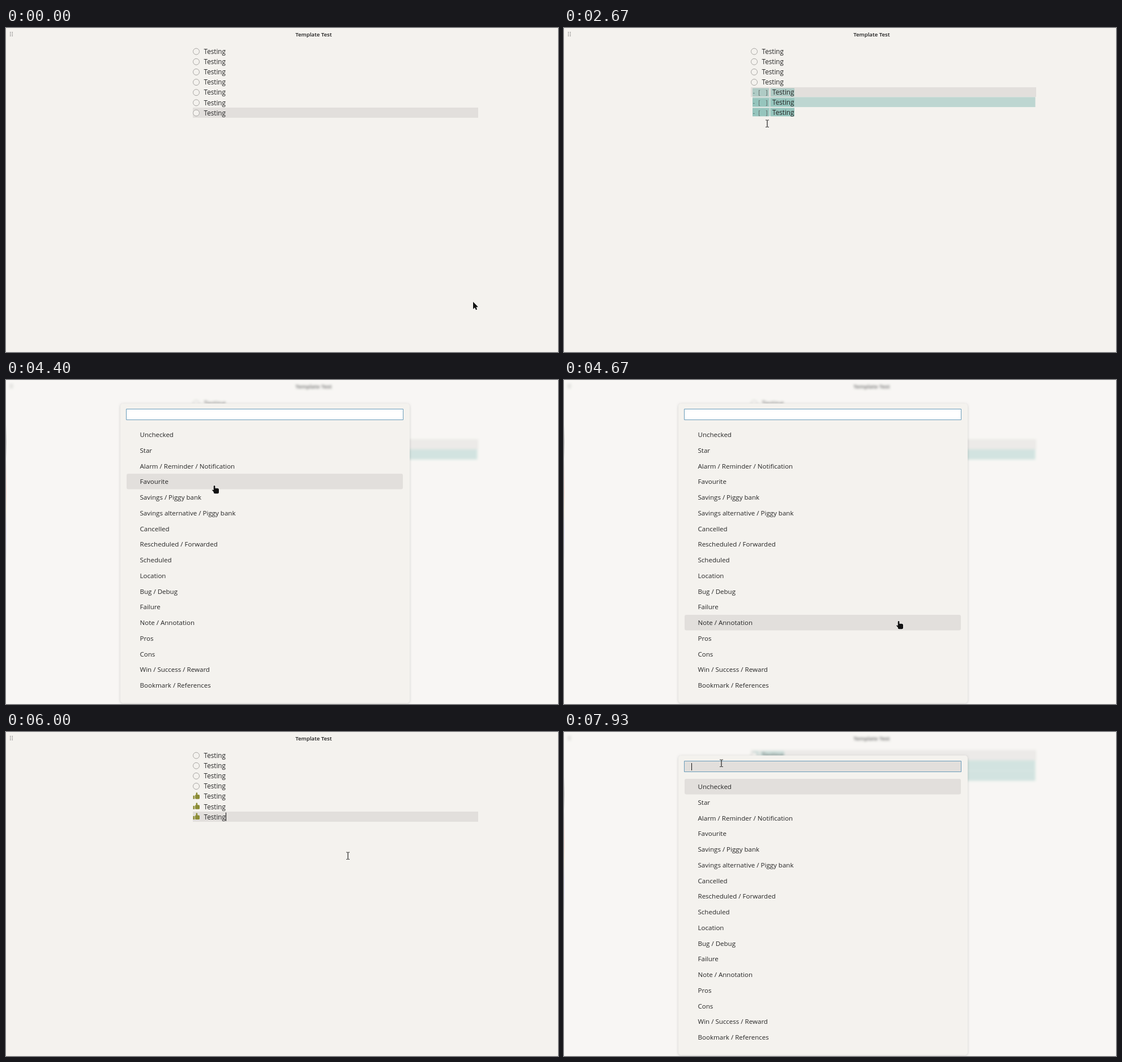
An HTML page with a canvas for the animation above (8000 ms loop, 975x574 px).

```html
<!DOCTYPE html>
<html lang="en">
<head>
<meta charset="utf-8">
<title>Template Test</title>
<style>
html, body { margin: 0; width: 975px; height: 574px; overflow: hidden; background: #f4f2ee; }
canvas { display: block; }
</style>
</head>
<body>
<canvas id="stage" width="975" height="574"></canvas>
<script>
const W = 975, H = 574, LOOP = 8000;
const BG = '#f4f2ee', GRAY = '#e2dfdc', TEAL = '#bdd6d1', INK = '#262626';
const MARK = 'rgba(72,160,150,.33)';
const SANS = '"Open Sans", "Noto Sans", sans-serif';
const ROW_TOP = 32, ROW_H = 18.15, RAW_H = 17.75;
const ITEM_TOP = 83, ITEM_H = 27.75;
const ITEMS = ['Unchecked', 'Star', 'Alarm / Reminder / Notification', 'Favourite',
  'Savings / Piggy bank', 'Savings alternative / Piggy bank', 'Cancelled',
  'Rescheduled / Forwarded', 'Scheduled', 'Location', 'Bug / Debug', 'Failure',
  'Note / Annotation', 'Pros', 'Cons', 'Win / Success / Reward', 'Bookmark / References'];

// Pointer moves: begin, end, goal x, goal y; it rests in between
const MOVES = [
  [0, 530, 323, 152], [530, 730, 414, 151],
  [1730, 2530, 330, 113], [2600, 2670, 359, 169],
  [4200, 4400, 368, 187], [4400, 4670, 591, 427], [4670, 5270, 602, 455],
  [5470, 6000, 604, 219], [6000, 6270, 400, 97],
  [6330, 6870, 270, 36], [7130, 7470, 278, 55]];

const stage = document.getElementById('stage');
const ctx = stage.getContext('2d');
const page = document.createElement('canvas');
page.width = W;
page.height = H;
const pageCtx = page.getContext('2d');

const between = (t, a, b) => t >= a && t < b;
const clamp = (v, lo, hi) => Math.min(hi, Math.max(lo, v));

function pointer(t) {
  let x = 825, y = 485;
  for (const [begin, end, goalX, goalY] of MOVES) {
    const k = clamp((t - begin) / (end - begin), 0, 1);
    x += (goalX - x) * k;
    y += (goalY - y) * k;
  }
  return { x, y };
}

function rect(g, x, y, w, h, fill) {
  g.fillStyle = fill;
  g.fillRect(x, y, w, h);
}

function rounded(g, x, y, w, h, r, fill) {
  g.beginPath();
  g.roundRect(x, y, w, h, r);
  g.fillStyle = fill;
  g.fill();
}

function label(g, str, x, y, font, fill = INK) {
  g.font = font;
  g.fillStyle = fill;
  g.fillText(str, x, y);
}

// Editor state at time t: active row, selection, raw rows, caret
function editor(t, p) {
  const s = { active: 6, from: -1, to: -1, headX: 389, raw: false, caret: true, done: t >= 5470 };
  const select = (lo, hi, dragging) => {
    const row = Math.floor((p.y - ROW_TOP) / ROW_H);
    s.active = s.from = dragging ? clamp(row, lo, hi) : lo;
    s.to = hi;
    const column = clamp(Math.round((p.x - 350) / 5.6), 0, 7);
    s.headX = !dragging || p.x < 347 ? 333 : 350 + column * 5.6;
  };
  if (t < 1730) {
    s.caret = t >= 1070;
  } else if (t < 5470) {
    select(4, 6, t < 2530);
    s.raw = between(t, 2600, 3670);
    s.caret = t < 2670 || between(t, 3270, 3670);
  } else if (t >= 6330) {
    select(0, 3, t < 6870);
    s.raw = between(t, 7130, 7800);
    s.caret = t < 7400;
  }
  return s;
}

function thumb(g, y) {
  const fill = '#8b8c35';
  rect(g, 330.5, y - 1, 2.6, 6, fill);
  rounded(g, 334, y - 2.6, 8, 7.6, 1.6, fill);
  rounded(g, 335.6, y - 6.4, 2.6, 6, 1.2, fill);
}

function drawRow(g, i, y, h, s) {
  const picked = i >= s.from && i <= s.to;
  const raw = s.raw && picked;
  const end = raw ? 407 : 389;
  if (i === s.active) rect(g, 330, Math.round(y), 504, Math.round(y + h) - Math.round(y), GRAY);
  if (picked) {
    if (i > s.from && i < s.to) rect(g, 333, y, 499.5, h, TEAL);
    else if (i === s.to && i > s.from) rect(g, 333, y + 1, end - 333, 15, TEAL);
    const left = i === s.from ? s.headX : 333;
    for (const [a, b] of raw ? [[333, 362], [365, end]] : [[333, 344], [347, end]]) {
      const x = Math.max(a, left);
      if (b > x) rect(g, x, y + 2, b - x, 14.6, MARK);
    }
  }
  const mid = y + 9.6;
  if (raw) {
    const mono = '11px "DejaVu Sans Mono", monospace';
    label(g, '-', 332, y + 13.4, mono, '#5c7a76');
    label(g, '[ ]', 341.5, y + 13.4, mono, '#66706d');
  } else if (s.done && i > 3) {
    thumb(g, mid - .5);
  } else {
    g.beginPath();
    g.arc(336, mid, 5.5, 0, 7);
    g.fillStyle = BG;
    g.fill();
    g.strokeStyle = '#a9a7a4';
    g.lineWidth = 1;
    g.stroke();
  }
  label(g, 'Testing', raw ? 368 : 349.5, y + 13.8, '11.7px ' + SANS);
  if (s.caret && i === s.active) rect(g, Math.round(s.headX) - 1, y + 1.8, 1, 15, '#111');
}

function drawPage(g, s) {
  rect(g, 0, 0, W, H, BG);
  for (let i = 0; i < 6; i++) rect(g, 7 + (i % 2) * 3.5, 7 + (i >> 1) * 3, 1.4, 1.4, '#777');
  g.textAlign = 'center';
  label(g, 'Template Test', 543.3, 14.6, '600 9.6px ' + SANS, '#1a1a1a');
  g.textAlign = 'left';
  let y = ROW_TOP;
  for (let i = 0; i < 7; i++) {
    const h = s.raw && i >= s.from && i <= s.to ? RAW_H : ROW_H;
    drawRow(g, i, y, h, s);
    y += h;
  }
}

function drawMenu(g, chosen, hot, caret) {
  rect(g, 0, 0, W, H, BG);
  g.filter = 'blur(2px)';
  g.drawImage(page, 0, 0);
  g.filter = 'none';
  rect(g, 0, 0, W, H, 'rgba(255,255,255,.32)');
  const edge = g.createLinearGradient(0, 80, 0, 320);
  ['#0000', '#4444', '#0000', '#f642', '#f643', '#fc42', '#66f2', '#88f2', '#0000']
    .forEach((c, i) => edge.addColorStop(i / 8, c));
  rect(g, 0, 80, 1, 240, edge);

  g.shadowColor = 'rgba(0,0,0,.16)';
  g.shadowBlur = 4;
  g.shadowOffsetY = 1;
  rounded(g, 202, 41.5, 511, 531, 5, BG);
  g.shadowColor = 'transparent';
  g.shadowBlur = g.shadowOffsetY = 0;

  rect(g, 212, 52, 490, 19, hot ? GRAY : '#fff');
  g.lineWidth = 1;
  g.strokeStyle = '#6a9cba';
  g.strokeRect(212.5, 51.5, 489, 19);
  if (caret) rect(g, 225, 55, 1, 13, '#111');
  ITEMS.forEach((name, i) => {
    const y = ITEM_TOP + i * ITEM_H;
    if (i === chosen) rounded(g, 213, Math.round(y), 488, 27.5, 3, GRAY);
    label(g, name, 236.5, y + 18, '11.55px ' + SANS);
  });
}

// Black shape with a thin light rim
function inked(g, path) {
  g.lineJoin = 'round';
  g.lineWidth = 1.4;
  g.strokeStyle = 'rgba(255,255,255,.85)';
  g.stroke(path);
  g.fillStyle = '#111';
  g.fill(path);
}

const cursors = {
  arrow(g, x, y) {
    g.save();
    g.translate(x, y);
    inked(g, new Path2D('M0 0V13L3 10.2L5 14.6L7.2 13.6L5.3 9.4L9 9.2Z'));
    g.restore();
  },
  beam(g, x, y) {
    x = Math.round(x);
    y = Math.round(y);
    rect(g, x - .6, y - 6, 1.2, 12.5, '#222');
    for (const dy of [-6.4, 6]) {
      for (const dx of [-3, .5]) rect(g, x + dx, y + dy, 2.5, 1, '#333');
    }
  },
  hand(g, x, y) {
    const path = new Path2D();
    path.roundRect(x - 1.3, y, 2.7, 10, 1.3);
    path.roundRect(x - 1.3, y + 4.8, 9.3, 9.4, 2.5);
    path.moveTo(x - 4.6, y + 7.4);
    path.lineTo(x - 1, y + 8);
    path.lineTo(x + 1, y + 14);
    path.closePath();
    inked(g, path);
  }
};

function draw(t) {
  const p = pointer(t);
  const first = between(t, 3670, 5470), second = t >= 7800;
  drawPage(pageCtx, editor(t, p));
  let shape = p.x < 318 || p.y > 470 ? 'arrow' : 'beam';
  if (first || second) {
    const chosen = first && t > 4200 ? Math.floor((p.y - ITEM_TOP) / ITEM_H) : 0;
    const caret = second || t < 4200 || between(t, 4730, 5270);
    drawMenu(ctx, chosen, second && t >= 7870, caret);
    shape = first ? 'hand' : t >= 7870 ? 'beam' : 'arrow';
  } else {
    ctx.drawImage(page, 0, 0);
  }
  cursors[shape](ctx, p.x, p.y);
}

// Motion advances 15 steps a second
function tick(now) {
  const step = Math.floor((Math.max(0, now - start) % LOOP + 4) * 15 / 1000) % 120;
  draw(Math.round(step * 100 / 15) * 10);
  requestAnimationFrame(tick);
}

const start = performance.now();
draw(0);
requestAnimationFrame(tick);
</script>
</body>
</html>
```
